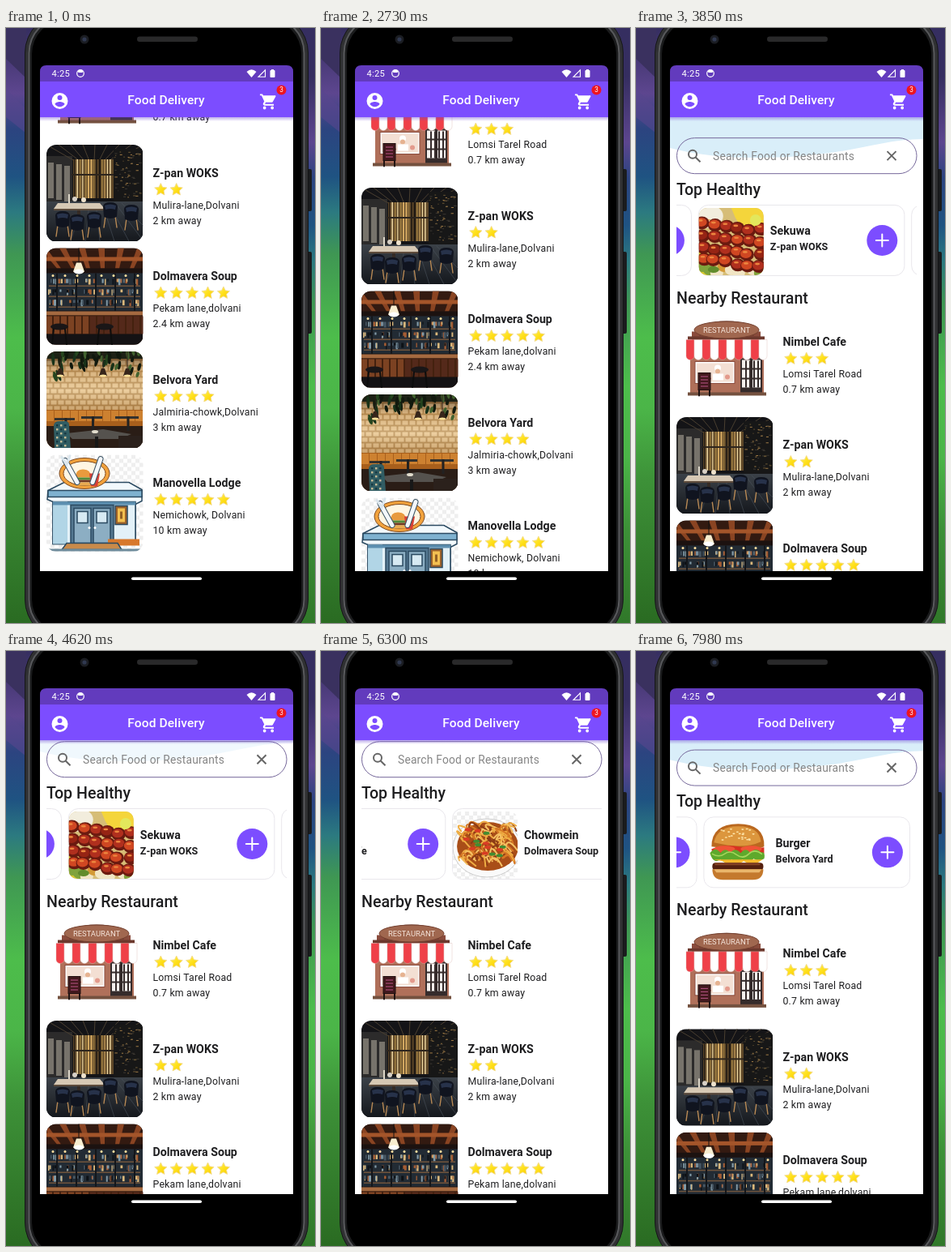
An HTML page for the animation above (8 s loop, 382 by 734 pixels).

```html
<!DOCTYPE html>
<html lang="en">
<head>
<meta charset="utf-8">
<title>Food Delivery</title>
<style>
html, body { margin: 0; width: 100%; height: 100%; overflow: hidden; background: #000; }
svg { display: block; width: 382px; height: 734px; font-family: Roboto, "Open Sans", sans-serif; }
</style>
</head>
<body>
<svg id="stage" viewBox="0 0 382 734" xmlns="http://www.w3.org/2000/svg"></svg>
<script>
const R = (x, y, w, h, fill, more = '') => `<rect x="${x}" y="${y}" width="${w}" height="${h}" fill="${fill}" ${more}/>`;
const E = (x, y, rx, ry, fill, more = '') => `<ellipse cx="${x}" cy="${y}" rx="${rx}" ry="${ry}" fill="${fill}" ${more}/>`;
const C = (x, y, r, fill, more) => E(x, y, r, r, fill, more);
const P = (d, fill, more = '') => `<path d="${d}" fill="${fill}" ${more}/>`;
const L = (d, color, w) => P(d, 'none', `stroke="${color}" stroke-width="${w}" stroke-linecap="round"`);
const T = (x, y, size, text, more = '') => `<text x="${x}" y="${y}" font-size="${size}" ${more}>${text}</text>`;
const G = (x, y, body, more = '') => `<g transform="translate(${x} ${y})" ${more}>${body}</g>`;
const many = (n, f) => Array.from({ length: n }, (_, i) => f(i)).join('');
const grad = (id, stops, x2 = 0, y2 = 1) => `<linearGradient id="${id}" x1="0" y1="0" x2="${x2}" y2="${y2}">${
  stops.map(([o, c]) => `<stop offset="${o}" stop-color="${c}"/>`).join('')}</linearGradient>`;
const clip = (id, body) => `<clipPath id="${id}">${body}</clipPath>`;
let seed = 7;
const rnd = (a, b) => a + (b - a) * ((seed = seed * 16807 % 2147483647) / 2147483647);
const pick = list => list[Math.floor(rnd(0, list.length))];

const PURPLE = '#7c4dff', INK = '#1e1e20';
const ACCOUNT = 'M12 2a10 10 0 1 0 0 20a10 10 0 1 0 0-20zm0 3a3 3 0 1 1 0 6a3 3 0 1 1 0-6zm0 14.2c-2.5 0-4.71-1.28-6-3.22.03-1.99 4-3.08 6-3.08s5.97 1.09 6 3.08c-1.29 1.94-3.5 3.22-6 3.22z';
const CART = 'M7 18a2 2 0 1 0 0 4a2 2 0 1 0 0-4zM1 2v2h2l3.6 7.6-1.35 2.4C4.5 15.4 5.5 17 7 17h12v-2H7.4l1.1-2h7.45c.75 0 1.4-.4 1.75-1L21.3 5.5A1 1 0 0 0 20 4H5.2l-.9-2zM17 18a2 2 0 1 0 0 4a2 2 0 1 0 0-4z';

const checker = (w, h) => R(0, 0, w, h, '#fff') + many(Math.ceil(w / 5) * Math.ceil(h / 5), i => {
  const cols = Math.ceil(w / 5), x = i % cols, y = Math.floor(i / cols);
  return (x + y) % 2 ? R(x * 5, y * 5, 5, 5, '#eee') : '';
});

function shop() {
  return R(19, 22, 85, 11, '#8a4b3c') + R(14, 28, 95, 4, '#6b382d')
    + P('M28 27Q28 9 62 9Q96 9 96 27Z', '#6b382d') + E(62, 20, 40, 10.5, '#a0674f', 'stroke="#74402f"')
    + T(62, 23.4, 9.4, 'RESTAURANT', 'text-anchor="middle" fill="#f6e6dc"')
    + R(17, 45, 91, 53, '#b0705a') + R(14, 97, 97, 4, '#74513f')
    + R(23, 59, 49, 27, '#fff', 'stroke="#8a4b3c"') + R(25, 61, 45, 23, '#f3dfd3')
    + C(51, 67, 4, '#fff') + C(51, 71, 3, '#e6b391') + R(45, 74, 13, 8, '#fff') + E(37, 80, 6, 2, '#d65b52') + C(63, 78, 3, '#e39a8c')
    + R(79, 55, 27, 42, '#352b2b') + many(6, i => R(81 + i % 2 * 13, 57 + (i >> 1) * 12, 10, 10, '#f4efec'))
    + many(4, i => R(85 + i * 5, 58, 2, 33, '#352b2b'))
    + R(27, 73, 15, 21, '#42191d', 'stroke="#20100f"') + many(4, i => R(30, 77 + i * 4, 9, 1, '#b58'))
    + L('M28 94V101M41 94V101', '#201312', 2)
    + many(10, i => P(`M${12 + i * 10} 32h10v20a5 5 0 0 1-10 0z`, i % 2 ? '#fff' : '#ef4048', 'stroke="#d8b6b1" stroke-width=".4"'));
}

const chair = (x, y, s) => G(x, y, L('M-6 8L-8 22M6 8L8 22', '#b98a55', 1.4)
  + P('M-9-4Q-8-9 0-9T9-4L8 9Q0 13-8 9Z', '#10141f') + P('M-7-5Q0-8 7-5L6 0Q0-2-6 0Z', '#27324a'), `scale="${s}"`);

function diner() {
  return R(0, 0, 119, 119, '#141417') + R(0, 14, 32, 58, '#2c2b2b') + many(3, i => R(2 + i * 10, 22 + i * 2, 7, 44, '#77736b'))
    + many(9, i => L(`M${i * 15} 0L${35 + i * 6} 20`, '#4a3f30', 1))
    + R(33, 18, 50, 48, '#5f4829') + many(14, i => R(34 + i * 3.4, 18, rnd(1, 2.3), 48, pick(['#d6ab62', '#1d1712', '#99793f', '#f0d9a2'])))
    + R(31, 36, 53, 2, '#2d251d') + R(83, 5, 36, 66, '#171717')
    + many(70, () => R(rnd(84, 116), rnd(8, 66), rnd(1, 4), 1, pick(['#6b5735', '#a07b46', '#3a3630'])))
    + R(0, 70, 119, 49, 'url(#floor)') + many(7, i => L(`M${45 + i * 8} 72L${30 + i * 18} 119`, '#4b535d', .6))
    + R(27, 61, 2, 13, '#ded7c9') + C(35, 67, 3, '#d7d0c6') + C(46, 68, 3, '#eee2cc')
    + P('M14 72H66L72 79H9Z', '#d6c8b4') + R(9, 79, 63, 2, '#5d4b3b') + R(38, 81, 4, 24, '#352b25')
    + chair(20, 91, 1) + chair(38, 95, 1) + chair(59, 92, 1) + chair(79, 80, 1) + chair(105, 83, 1);
}

function bar() {
  return R(0, 0, 119, 119, '#1d1819') + R(0, 0, 119, 27, '#331a11')
    + many(6, i => P(`M${i * 24 - 8} 0h8l${18 - i * 6} 25h-5z`, '#8a4422')) + R(0, 11, 119, 5, '#a4552a') + R(0, 25, 119, 6, '#1c1210')
    + R(0, 31, 119, 46, '#222b34') + many(3, i => R(3, 46 + i * 13, 113, 1.5, '#70543c'))
    + many(120, () => R(rnd(2, 114), 38 + Math.floor(rnd(0, 3)) * 13, rnd(1, 3), rnd(3, 8), pick(['#8199a6', '#d9b77b', '#0d1116', '#465663', '#a55d34'])))
    + many(5, i => R(12 + i * 24, 31, 2, 48, '#14161a')) + many(8, i => C(8 + i * 15, 34, 1.5, '#ffe1a0'))
    + R(0, 78, 119, 5, '#a56a40') + R(0, 83, 119, 36, '#44210f')
    + many(14, i => R(i * 9, 84, 7, 22, i < 6 ? '#7c4222' : '#54291a'))
    + R(0, 106, 119, 13, '#141214') + [16, 72].map(x => G(x, 97, E(0, 0, 11, 4, '#1a1617') + L('M-7 3L-9 22M7 3L9 22', '#0d0d0d', 2))).join('')
    + L('M40 0V17', '#111', 1) + P('M37 18h6l4 11q-7 5-14 0z', '#f8edcf') + E(40, 29, 6, 3, '#fff');
}

function lounge() {
  return R(0, 0, 119, 119, 'url(#brick)')
    + many(9, r => many(15, c => R(c * 9 - (r % 2) * 4, 11 + r * 7, 8, 6, '#fff3d8', 'opacity=".28" stroke="#62441f" stroke-width=".8"')))
    + R(0, 0, 119, 9, '#1d2115') + many(55, () => E(rnd(0, 119), rnd(0, 15), 2, rnd(3, 8), pick(['#183219', '#26451f', '#42622f', '#11190d']), `transform="rotate(${Math.floor(rnd(-25, 25))} 60 5)"`))
    + [17, 70, 100].map(x => L(`M${x} 0V22`, '#2c2118', 1) + P(`M${x - 5} 30L${x - 2} 21h4l3 9z`, '#37251a') + E(x, 30, 4, 1.5, '#ffe29a')).join('')
    + R(0, 72, 119, 29, '#a85f1c') + many(12, i => R(i * 10, 73, 9, 13, '#cd8130')) + R(0, 92, 119, 27, '#2a1d16')
    + [[10, 82, 25], [43, 80, 26], [85, 80, 29]].map(([x, y, w]) => R(x, y, w, 3, '#34322e') + R(x + w / 2, y, 3, 18, '#222')).join('')
    + P('M25 101L70 96L105 102L91 108H32Z', '#55524e') + R(60, 105, 4, 14, '#181818')
    + R(89, 104, 30, 15, '#2b211c') + E(60, 99, 4, 2, '#e2ddce')
    + P('M9 91Q10 86 16 86H24Q29 87 28 93L30 119H10Z', '#315d63')
    + many(18, i => R(12 + i % 3 * 5, 90 + Math.floor(i / 3) * 5, 2.5, 2.5, i % 2 ? '#c3b995' : '#173943'));
}

function hotel() {
  const edge = 'stroke="#2b4a61" stroke-width="1.5"';
  return checker(119, 119) + P('M2 44L22 34H102L118 43V57L110 61V110H8V58L1 55Z', '#f2f9fd', edge)
    + P('M2 44H118V52H2Z', '#7fb2d0', edge) + R(8, 58, 102, 52, '#e3f1f8', edge) + R(8, 58, 18, 52, '#b1d5e6') + R(8, 58, 102, 4, '#5c8fb0')
    + E(47, 23, 31, 19, '#f2a23c', 'stroke="#7d4a22"') + E(47, 23, 26, 15, '#fff6e3', 'stroke="#7d4a22"')
    + P('M36 28Q36 17 46 18Q55 18 55 28Z', '#e89a3e') + R(35, 28, 21, 3, '#528c3a') + R(35, 31, 21, 3, '#733a22') + R(36, 34, 19, 4, '#e9ab51', 'rx="2"')
    + P('M53 23h13l-3 16h-8z', '#d84136') + L('M60 23L63 11', '#f6fbff', 2)
    + L('M23 7L38 34', '#3b5364', 7) + L('M23 7L38 34', '#f4f8fb', 5) + L('M19 3L25 12L29 1', '#dbe6ed', 3)
    + L('M67 5L57 34', '#3b5364', 7) + L('M67 5L57 34', '#f4f8fb', 5)
    + R(30, 62, 53, 48, '#547891', edge) + R(34, 66, 21, 43, '#8caec3', edge) + R(58, 66, 21, 43, '#8caec3', edge)
    + R(38, 70, 13, 14, '#d7eaf3', edge) + R(62, 70, 13, 14, '#d7eaf3', edge) + C(53, 90, 1.5, '#fff') + C(60, 90, 1.5, '#fff')
    + R(85, 63, 15, 23, '#9c612a', edge) + R(88, 66, 9, 17, '#f3c051') + R(91, 70, 3, 9, '#936125')
    + R(76, 104, 39, 8, '#d8782c') + P('M25 109H88L93 117H19Z', '#c98a4a', edge) + R(0, 116, 119, 3, '#6f8c9c');
}

function momo() {
  return checker(80, 84) + many(15, i => E(7 + i * 5, 70 + 6 * Math.sin(i * 2), 9, 7, i % 2 ? '#4f962f' : '#79b847'))
    + E(72, 42, 9, 12, '#6dab3c') + E(29, 25, 30, 15, '#f8f5f1', 'stroke="#c9c3bd"') + E(29, 19, 28, 10, '#bd5a20') + E(29, 20, 25, 8, '#dd7a2c') + E(26, 18, 9, 3, '#f1a34d')
    + [[58, 38, 15], [17, 47, 16], [42, 45, 18], [26, 57, 19], [60, 54, 18]].map(([x, y, r]) =>
      E(x, y, r, 11, '#e0cfae', 'stroke="#b09468"') + E(x, y - 3, r - 4, 7, '#f7edd6')
      + many(5, i => L(`M${x} ${y - 8}Q${x - 7 + i * 3} ${y - 3} ${x - 10 + i * 5} ${y + 5}`, '#c8b18a', .9))).join('');
}

function noodles() {
  return checker(80, 84) + E(42, 45, 42, 36, '#fafafa', 'stroke="#ccc"') + E(43, 43, 38, 30, '#a94e18')
    + many(80, () => { const x = rnd(8, 68), y = rnd(18, 64); return L(`M${x} ${y}q${rnd(-12, 12)} -12 ${rnd(8, 16)} ${rnd(-4, 8)}`, pick(['#efad43', '#d77825', '#f6c264', '#8c3b15']), 2); })
    + many(14, () => E(rnd(10, 65), rnd(20, 62), 4, 2, pick(['#438c32', '#d93c24', '#75a23b'])));
}

function skewers() {
  return R(0, 0, 80, 84, '#d6bd77') + P('M40 0H80V28Q60 38 45 12Z', '#f4d53b') + E(8, 10, 22, 15, '#f2eddd') + E(3, 72, 17, 18, '#d9ca30')
    + many(9, i => E(4 + i * 9, 72 + i % 3 * 4, 8, 7, pick(['#f1e5c4', '#80a33c', '#d49a36'])))
    + many(4, r => L(`M${-4 + r * 5} ${12 + r * 17}L80 ${26 + r * 14}`, '#e3b766', 1.5))
    + many(24, i => {
      const x = 5 + i % 6 * 14 + rnd(-2, 2), y = 18 + Math.floor(i / 6) * 15 + (i % 6) * 2 + rnd(-2, 2);
      return E(x, y, 9, 8, '#6b1a10') + E(x - 1, y - 1, 7, 5.5, pick(['#b02f1e', '#d04722', '#962414'])) + E(x - 2, y - 3, 3, 1.3, '#ed873f');
    }) + C(70, 15, 7, '#e3e75c') + E(18, 76, 7, 4, '#628c2d');
}

function burger() {
  return P('M9 33Q9 5 42 5T74 33Q60 40 9 33Z', '#ba681f') + P('M12 28Q16 8 42 8T70 27Q49 37 12 28Z', '#dc963d')
    + many(24, () => E(rnd(21, 63), rnd(11, 25), 1.6, .8, '#ffe7ac'))
    + P('M9 36Q24 30 42 33T74 34V42H10Z', '#d83222') + E(25, 36, 13, 4, '#ef5436') + E(58, 36, 13, 4, '#ef5436')
    + P('M7 41q7-9 13 0q6-8 12 0q6-8 13 0q6-8 12 0q6-8 13-1q6-1 4 8q-7 4-13 0q-7 8-14 1q-7 8-13 0q-7 7-14 0q-9 6-13-8z', '#5ea92c')
    + L('M10 42q8 5 15 0t15 1t15-1t16 0', '#a4d65d', 1.5)
    + P('M11 49H72L60 57L49 51L34 59L23 51Z', '#f5b72b') + R(10, 53, 63, 9, '#54200f', 'rx="4"') + R(13, 53, 56, 3, '#824024', 'rx="1"')
    + P('M10 61H73Q73 74 60 74H23Q10 74 10 61Z', '#c4792d') + P('M12 61H71L68 65H15Z', '#e9b56b');
}

const star = P(many(10, i => {
  const a = i * Math.PI / 5, r = i % 2 ? 3.9 : 8;
  return `${i ? 'L' : 'M'}${(r * Math.sin(a)).toFixed(2)} ${(-r * Math.cos(a)).toFixed(2)}`;
}) + 'Z', 'url(#gold)', 'stroke="#f3dc91" stroke-width=".9" stroke-linejoin="round"');

const places = [
  ['Nimbel Cafe', 3, 'Lomsi Tarel Road', '0.7', shop],
  ['Z-pan WOKS', 2, 'Mulira-lane,Dolvani', '2', diner],
  ['Dolmavera Soup', 5, 'Pekam lane,dolvani', '2.4', bar],
  ['Belvora Yard', 4, 'Jalmiria-chowk,Dolvani', '3', lounge],
  ['Manovella Lodge', 5, 'Nemichowk, Dolvani', '10', hotel]
];
const dishes = [
  ['Momo', 'Nimbel Cafe', momo], ['Chowmein', 'Dolmavera Soup', noodles],
  ['Sekuwa', 'Z-pan WOKS', skewers], ['Burger', 'Belvora Yard', burger]
];

const placeRow = ([name, stars, street, km, draw], i) => G(50, 328.5 + i * 127.5,
  G(0, 0, draw(), 'clip-path="url(#photo)"')
  + T(131.5, 39.5, 14.2, name, 'font-weight="700"')
  + many(stars, s => G(141.3 + s * 19.4, 55.5, star))
  + T(131.5, 78.5, 12.3, street, 'letter-spacing=".2"') + T(131.5, 97.5, 12.3, km + ' km away', 'letter-spacing=".2"'));

const dishCard = ([name, place, draw], i) => G(i * 263.4, 194,
  R(0, .5, 254.6, 87, '#fff', 'rx="12" stroke="#e9e7ec"')
  + G(.5, 4, draw(), 'clip-path="url(#dish)"')
  + T(88.5, 37.5, 14.2, name, 'font-weight="600"') + T(88.5, 56.5, 12.5, place, 'font-weight="600"')
  + C(227, 44, 19, PURPLE) + L('M219.5 44H234.5M227 36.5V51.5', '#fff', 2));

const heading = (y, text) => T(50, y, 19.6, text, 'font-weight="500"');

const wave = P('M42 0H355V123C315 123 285 134 240 140S110 152 42 134Z', '#d9eef9', 'id="wave"');

const list = `<g id="list" fill="${INK}">`
  + R(50.5, 111.7, 296.5, 44, 'none', 'rx="22" stroke="#76689b"')
  + `<g fill="none" stroke="#666" stroke-width="2"><circle cx="70" cy="131.8" r="5"/><path d="M73.7 135.5L79.5 141.3M310.5 128.2L321.5 139.2M321.5 128.2L310.5 139.2"/></g>`
  + T(95, 139, 13.8, 'Search Food or Restaurants', 'fill="#858585" letter-spacing=".2"')
  + heading(182, 'Top Healthy')
  + `<g clip-path="url(#strip)"><g id="cards">${dishes.map(dishCard).join('')}</g></g>`
  + heading(316, 'Nearby Restaurant') + places.map(placeRow).join('') + '</g>';

const bars = R(42, 110, 313, 5, 'url(#shade)') + P('M42 66V54Q42 46 50 46H347Q355 46 355 54V66Z', '#623bbd') + R(42, 66, 313, 44, PURPLE)
  + '<g fill="#fff">' + T(56.5, 60.2, 11.2, '4:25', 'letter-spacing=".2"')
  + C(92, 56, 4.3, 'none', 'stroke="#fff" stroke-width="1.2"') + R(89, 52, 6, 3, '#fff', 'rx="1"')
  + P('M297.5 54Q303.5 48.5 309.5 54L303.5 61Z', '#fff') + P('M312 60.3H320.5V51.8Z', 'none', 'stroke="#fff" stroke-width="1.1"')
  + R(326.5, 52, 6, 9, '#fff', 'rx="1"') + R(328, 51, 3, 2, '#fff')
  + G(54.5, 78, P(ACCOUNT, '#fff', 'fill-rule="evenodd"'))
  + T(198, 94, 15.5, 'Food Delivery', 'text-anchor="middle" font-weight="500" letter-spacing=".1"')
  + G(313, 79.5, `<g transform="scale(.95)">${P(CART, '#fff')}</g>`)
  + C(340.5, 76.5, 6, '#ee1520') + T(340.5, 79.4, 8.2, '3', 'text-anchor="middle"') + '</g>';

const phone = R(0, 0, 382, 734, 'url(#wall)')
  + R(190, 0, 192, 60, '#352e60') + G(190, 60, R(0, 0, 192, 734, 'url(#wall)'))
  + P('M0 0H25V62L0 38Z', '#3a315f') + P('M0 75L25 100V130L0 110Z', '#57468e', 'opacity=".6"')
  + R(371, 174, 7, 52, '#1b1c1e', 'rx="2"') + R(371, 276, 7, 101, '#1b1c1e', 'rx="2"')
  + R(23.5, -19, 350, 774, '#303133', 'rx="50" stroke="#151617"')
  + R(28.5, -14, 340, 764, '#1a1b1c', 'rx="45" stroke="#58595c" stroke-width="2"')
  + R(32, -10, 333, 757, '#000', 'rx="42"')
  + C(97, 14, 5.5, '#1b1d22') + C(97, 14, 2.6, '#303950')
  + R(162, 10.5, 75, 6.5, '#29292a', 'rx="3.2"') + R(155, 677.5, 87, 3.6, '#fff', 'rx="1.8"');

document.getElementById('stage').innerHTML = '<defs>'
  + grad('wall', [[0, '#352e60'], [.11, '#5d468f'], [.17, '#2c4480'], [.25, '#1f5382'], [.31, '#2c7a80'], [.38, '#3f9753'], [.52, '#4dbd4b'], [.64, '#4bb548'], [.76, '#3d9138'], [1, '#2a6b22']])
  + grad('floor', [[0, '#3b4148'], [1, '#15181d']])
  + grad('brick', [[0, '#4a3119'], [.2, '#c99a5c'], [.4, '#e6c18a'], [.6, '#b98748'], [1, '#6b4524']])
  + grad('gold', [[0, '#fff06a'], [.5, '#ffe11c'], [1, '#f9c900']], 1, 1) + grad('shade', [[0, '#6b45d070'], [1, '#6b45d000']])
  + clip('screen', R(42, 108, 313, 562, '#000')) + clip('strip', R(50, 190, 297, 96, '#000'))
  + clip('photo', R(0, 0, 119.5, 119.5, '#000', 'rx="12"')) + clip('dish', R(0, 0, 80, 83, '#000', 'rx="10"'))
  + '</defs>' + phone + `<g clip-path="url(#screen)">${R(42, 108, 313, 562, '#fff')}${wave}${list}</g>` + bars;

const smooth = k => k * k * (3 - 2 * k), out = k => 1 - (1 - k) ** 2;
// Critically damped return after pulling past the end of a list.
const spring = k => 1 - (1 + 6 * k) * Math.exp(-6 * k);
// Keys are [time, value, easing towards this key].
function track(keys, t) {
  const i = keys.findIndex(k => k[0] > t);
  if (i < 0) return keys[keys.length - 1][1];
  if (!i) return keys[0][1];
  const [t0, a] = keys[i - 1], [t1, b, ease = smooth] = keys[i];
  return a + (b - a) * ease((t - t0) / (t1 - t0));
}
const scrollKeys = [[2660, -312], [2730, -259], [3150, -79, out], [3570, -79], [3990, 60], [4500, 0, spring], [7210, 0], [7700, 65], [8210, 0, spring]];
const cardKeys = [[4620, -449.5], [5040, 70], [5600, 56, spring], [6160, 56], [6650, -735], [7210, -706.3, spring]];
const waveKeys = [[3780, 0], [3850, 1], [4410, 1], [4620, .4], [4760, 0], [7210, 0], [7350, 1]];
const [listNode, cardNode, waveNode] = ['list', 'cards', 'wave'].map(id => document.getElementById(id));

function frame() {
  const t = Math.floor(performance.now() % 8000 / 70) * 70;
  const scroll = track(scrollKeys, t);
  listNode.setAttribute('transform', `translate(0 ${scroll})`);
  cardNode.setAttribute('transform', `translate(${track(cardKeys, t)} 0)`);
  waveNode.setAttribute('transform', `translate(0 ${Math.max(0, scroll) - 10})`);
  waveNode.setAttribute('opacity', track(waveKeys, t));
  requestAnimationFrame(frame);
}
frame();
</script>
</body>
</html>
```
